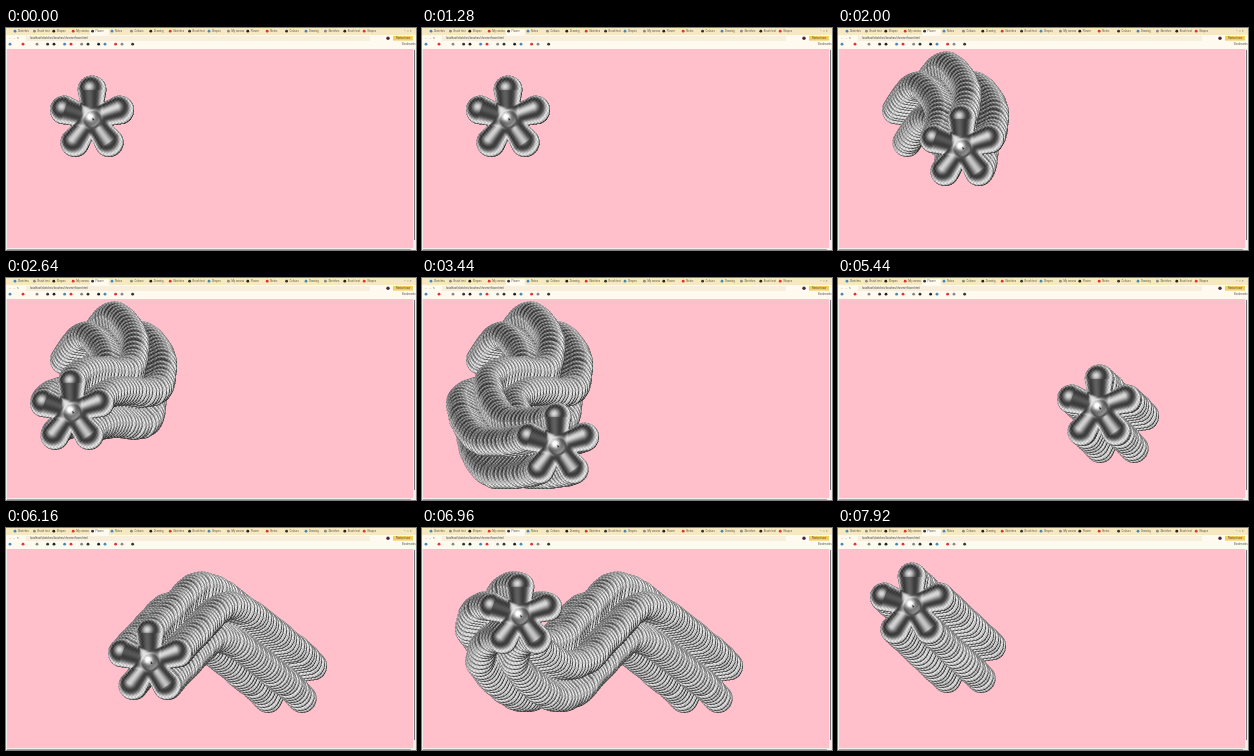
These frames come from a looping animation (410x222 px, 8000 ms). An HTML page with a canvas:

```html
<!DOCTYPE html>
<html lang="en">
<head>
<meta charset="utf-8">
<title>Chrome flower brush</title>
<style>
html, body { margin: 0; width: 100%; height: 100%; overflow: hidden; background: #ffc0cb; }
canvas { display: block; }
</style>
</head>
<body>
<canvas id="stage" width="410" height="222"></canvas>
<script>
const ctx = document.getElementById('stage').getContext('2d');
const LOOP = 8000, TICK = 80, GAP = 3, SIZE = 96;

// Each stroke starts on a cleared page and curves through [time, x, y]
const strokes = [
  { start: 0, keys: [[1400, 86, 91], [1720, 108, 67], [1890, 128, 89], [2000, 124, 120],
    [2350, 84, 122], [2640, 66, 134], [3200, 88, 172], [3440, 135, 168], [4000, 178, 130],
    [4400, 214, 92], [4900, 279, 147]] },
  { start: 4960, keys: [[5320, 279, 147], [5440, 261, 130], [5850, 196, 87], [6080, 158, 119],
    [6200, 138, 140], [6400, 112, 145], [6750, 76, 112], [6850, 81, 92], [6960, 98, 88],
    [7250, 126, 127]] },
  { start: 7300, keys: [[7600, 126, 127], [7920, 74, 78]] }
];

// Height of an inflated five-petal flower
function height(x, y) {
  let sum = 0;
  for (let i = 0; i < 5; i++) {
    const a = (i * 72 - 90) * Math.PI / 180, c = Math.cos(a), s = Math.sin(a);
    const u = Math.max(0, Math.min(29, x * c + y * s));
    const r = 9.5 + 5 * u / 29;
    const h2 = r * r - (x - u * c) ** 2 - (y - u * s) ** 2;
    if (h2 > 0) sum += h2 * h2;
  }
  return sum ** 0.25;
}

function makeFlower() {
  const n = SIZE * 2, e = 0.4;
  const sprite = document.createElement('canvas');
  sprite.width = sprite.height = n;
  const g = sprite.getContext('2d'), img = g.createImageData(n, n);
  for (let j = 0; j < n; j++) for (let i = 0; i < n; i++) {
    const x = (i + 0.5 - n / 2) / 2, y = (j + 0.5 - n / 2) / 2;
    if (!height(x, y)) continue;
    const hx = (height(x - e, y) - height(x + e, y)) / (2 * e);
    const hy = (height(x, y - e) - height(x, y + e)) / (2 * e);
    const len = Math.hypot(hx, hy, 1);
    // Reflections alternate with the angle away from a light at the upper left
    const angle = Math.acos(Math.min(1, (0.95 - 0.2 * hx - 0.24 * hy) / len));
    let v = 0.53 + 0.36 * Math.cos(5.2 * angle);
    v += 0.22 * (1 - 1 / len) * Math.sin(1.9 * x + 2 * Math.sin(1.3 * y));
    v *= 0.25 + 0.75 * Math.min(1, 2.6 / len);
    v += 0.4 * Math.exp(-(x * x + y * y) / 50);
    const k = (j * n + i) * 4;
    img.data.fill(22 + 222 * v, k, k + 3);
    img.data[k + 3] = 255;
  }
  g.putImageData(img, 0, 0);
  return sprite;
}
const flower = makeFlower();

// Smooth position along timed keys
function place(keys, t) {
  const last = keys.length - 1;
  if (t <= keys[0][0]) return keys[0].slice(1);
  if (t >= keys[last][0]) return keys[last].slice(1);
  let i = 0;
  while (keys[i + 1][0] <= t) i++;
  const a = keys[i], b = keys[i + 1], d = b[0] - a[0], u = (t - a[0]) / d;
  const slope = (k, c) => k === 0 || k === last ? 0 :
    (keys[k + 1][c] - keys[k - 1][c]) / (keys[k + 1][0] - keys[k - 1][0]);
  return [1, 2].map(c =>
    a[c] * (1 + 2 * u) * (1 - u) ** 2 + b[c] * u * u * (3 - 2 * u) +
    d * (slope(i, c) * u * (1 - u) ** 2 + slope(i + 1, c) * u * u * (u - 1)));
}

function stamp([x, y]) {
  ctx.drawImage(flower, Math.round(x) - SIZE / 2, Math.round(y) - SIZE / 2, SIZE, SIZE);
}

function rect(color, x, y, w, h) {
  ctx.fillStyle = color;
  ctx.fillRect(x, y, w, h);
}

function dot(color, x, y, r = 1.4) {
  ctx.fillStyle = color;
  ctx.beginPath();
  ctx.arc(x, y, r, 0, 7);
  ctx.fill();
}

function label(text, x, y, color = '#5d5648') {
  ctx.fillStyle = color;
  ctx.fillText(text, x, y);
}

const tabNames = ['Sketches', 'Brush test', 'Shapes', 'My canvas', 'Flower', 'Notes', 'Colours', 'Drawing'];
const iconColors = ['#48b', '#888', '#222', '#d33', '#333'];

function drawBrowser() {
  ctx.font = '2.7px Roboto, sans-serif';
  rect('#f7e9bf', 0, 0, 410, 7);
  rect('#fffaf0', 84, 1, 19, 6);
  for (let i = 0; i < 19; i++) {
    const x = 9 + i * 19.4;
    dot(iconColors[i % 5], x, 3.2);
    label(tabNames[i % 8], x + 3, 4.2);
  }
  label('–  □  ×', 398, 4.2);
  rect('#fffaf0', 0, 7, 410, 14);
  rect('#f7efdc', 20, 8, 344, 5);
  label('←  →  ↻', 3, 11.4);
  label('localhost/sketches/brushes/chrome-flower.html', 24, 11.3, '#444');
  dot('#4a2940', 382, 10.3, 1.7);
  rect('#f3cf62', 387, 8, 20, 4.6);
  label('Restart now', 390, 11.2, '#544');
  for (let i = 0; i < 14; i++) dot(iconColors[i * 3 % 5], i < 2 ? 4 + 13 * i : 14 + 8.5 * (i + i % 2 / 4), 16.2);
  label('Bookmarks', 396, 17.2);
}

function drawPage() {
  rect('#f1eeec', 0, 21, 410, 201);
  rect('#ffc0cb', 1, 21, 406, 199);
  rect('#77797c', 408, 22, 1, 190);
  rect('#a8a3a5', 1, 221, 404, 1);
}

function drawCursor([x, y]) {
  ctx.fillStyle = '#222';
  ctx.beginPath();
  ctx.moveTo(x + 0.5, y - 1.5);
  ctx.lineTo(x + 2.5, y + 1);
  ctx.lineTo(x + 0.5, y + 1.5);
  ctx.fill();
}

function draw(t) {
  drawPage();
  const { keys } = strokes.filter(s => s.start <= t).pop();
  let last = place(keys, 0);
  stamp(last);
  for (let s = keys[0][0]; s < t; s += 4) {
    const p = place(keys, s);
    if (Math.hypot(p[0] - last[0], p[1] - last[1]) >= GAP) stamp(last = p);
  }
  const tip = place(keys, t);
  stamp(tip);
  drawCursor(tip);
  drawBrowser();
}

let shown = -1;
const origin = performance.now();
function frame() {
  const t = Math.floor((performance.now() - origin) % LOOP / TICK) * TICK;
  if (t !== shown) draw(shown = t);
  requestAnimationFrame(frame);
}
frame();
</script>
</body>
</html>
```
